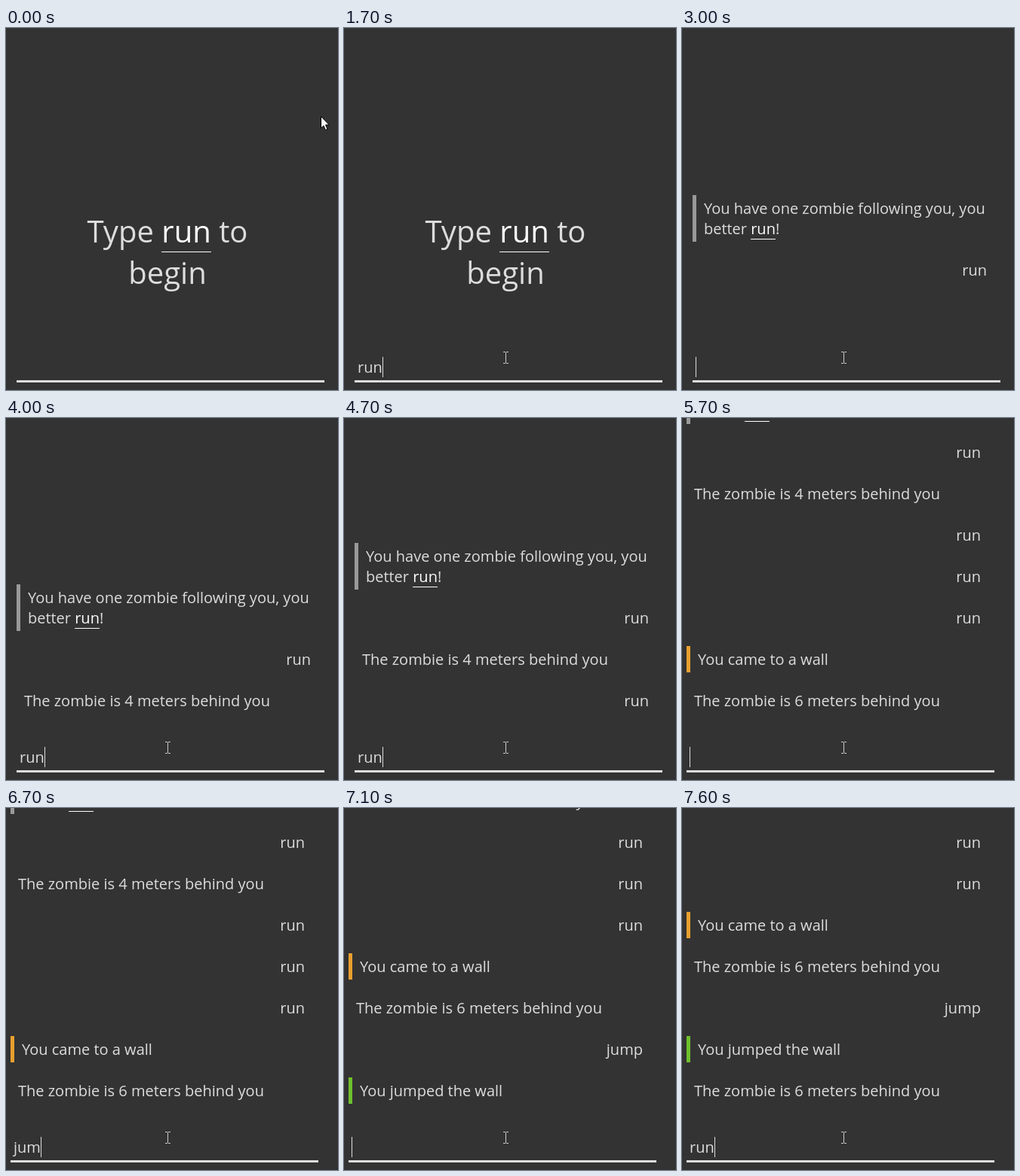
An HTML page for the animation above (8000 ms loop, 440 by 481 pixels).

```html
<!DOCTYPE html>
<html lang="en">
<head>
<meta charset="utf-8">
<title>Zombie run</title>
<style>
  html, body { margin: 0; width: 100%; height: 100%; overflow: hidden; background: #333; }
  body { position: relative; color: #ddd; font: 20px/27px "Open Sans", sans-serif; white-space: nowrap; }
  body > *, #page > * { position: absolute; }
  #page { left: 14px; top: 0; width: 408px; height: 481px; }
  #intro { top: 242px; width: 400px; font-size: 40px; line-height: 55px; text-align: center; }
  #chat { width: 400px; display: flex; flex-direction: column; gap: 20px; }
  #chat div { padding: 4px 10px; }
  #chat .me { text-align: right; }
  #chat .gray, #chat .orange, #chat .green { border-left: 5px solid #999; }
  #chat .orange { border-color: #e8a02e; }
  #chat .green { border-color: #6fc02d; }
  b { font-weight: 400; color: #fff; border-bottom: 1px solid #fff; }
  #input { left: 4px; top: 437px; height: 27px; white-space: pre; }
  #caret { position: absolute; left: 100%; top: 0; width: 1px; height: 27px; background: #ddd; }
  #line { top: 468px; width: 408px; height: 3px; background: #ddd; }
  #pointer { left: 0; top: 0; }
</style>
</head>
<body>
<div id="page">
  <div id="intro">Type <b>run</b> to<br>begin</div>
  <div id="chat"></div>
  <div id="input"><span id="typed"></span><i id="caret"></i></div>
  <div id="line"></div>
</div>
<svg id="pointer" width="440" height="481">
  <path id="arrow" d="M.5 .5V16L4 12.8 6.4 18.5 9 17.4 6.6 11.8H11.3Z" fill="#fff" stroke="#000"/>
  <path id="beam" d="M-3.5-7.5h3m1 0h3M0-7V7M-3.5 7.5h3m1 0h3" fill="none" stroke="#ccc"/>
</svg>
<script>
const LOOP = 8000;
const $ = id => document.getElementById(id);

const messages = [
  ['gray', 'You have one zombie following you, you<br>better <b>run</b>!'],
  ['me', 'run'],
  ['', 'The zombie is 4 meters behind you'],
  ['me', 'run'],
  ['me', 'run'],
  ['me', 'run'],
  ['orange', 'You came to a wall'],
  ['', 'The zombie is 6 meters behind you'],
  ['me', 'jump'],
  ['green', 'You jumped the wall'],
  ['', 'The zombie is 6 meters behind you']
];
$('chat').innerHTML = messages.map(([kind, text]) => `<div class="${kind}">${text}</div>`).join('');
const bubbles = [...$('chat').children];

// [time, typed text, caret visible]
const typing = [
  [0, '', 0], [800, '', 1], [1300, '', 0],
  [1500, 'r', 1], [1600, 'ru', 1], [1700, 'run', 1], [2200, 'run', 0], [2700, 'run', 1],
  [3000, '', 1], [3500, '', 0], [3800, 'r', 1], [3900, 'ru', 1], [4000, 'run', 1],
  [4200, '', 1], [4600, 'ru', 1], [4700, 'run', 1],
  [5000, '', 1], [5300, 'ru', 1], [5400, 'run', 1],
  [5700, '', 1], [6200, '', 0], [6600, 'j', 1], [6700, 'jum', 1], [6800, 'jump', 1],
  [7100, '', 1], [7400, 'r', 1], [7600, 'run', 1]
];

// [time, number of messages]
const history = [[0, 0], [3000, 2], [3800, 3], [4200, 4], [5000, 5], [5700, 8], [7100, 10], [7600, 11]];

// [time, x, y] of the pointer
const path = [[0, 417, 117], [100, 385, 168], [200, 303, 298], [300, 235, 405], [400, 215.5, 438], [800, 214.5, 438]];

const at = (list, t) => list.findLast(row => row[0] <= t);

function draw(t) {
  const [, text, caret] = at(typing, t);
  $('typed').textContent = text;
  $('caret').hidden = !caret;
  $('caret').style.display = caret ? 'block' : 'none';

  const [, count] = at(history, t);
  $('intro').style.display = count ? 'none' : 'block';
  bubbles.forEach((bubble, i) => bubble.style.display = i < count ? 'block' : 'none');
  // The first reply leaves an empty slot below it.
  $('chat').style.bottom = (count === 2 ? 142 : 88) + 'px';
  // The scrollbar narrows the page once the history overflows.
  $('page').style.left = (count >= 8 ? 6 : 14) + 'px';

  const [, x, y] = at(path, t);
  const overInput = t >= 400;
  for (const id of ['arrow', 'beam']) {
    $(id).setAttribute('transform', `translate(${x} ${y})`);
    $(id).style.display = (id === 'beam') === overInput ? 'block' : 'none';
  }
}

const start = performance.now();
function tick() {
  draw((performance.now() - start) % LOOP);
  requestAnimationFrame(tick);
}
tick();
</script>
</body>
</html>
```
